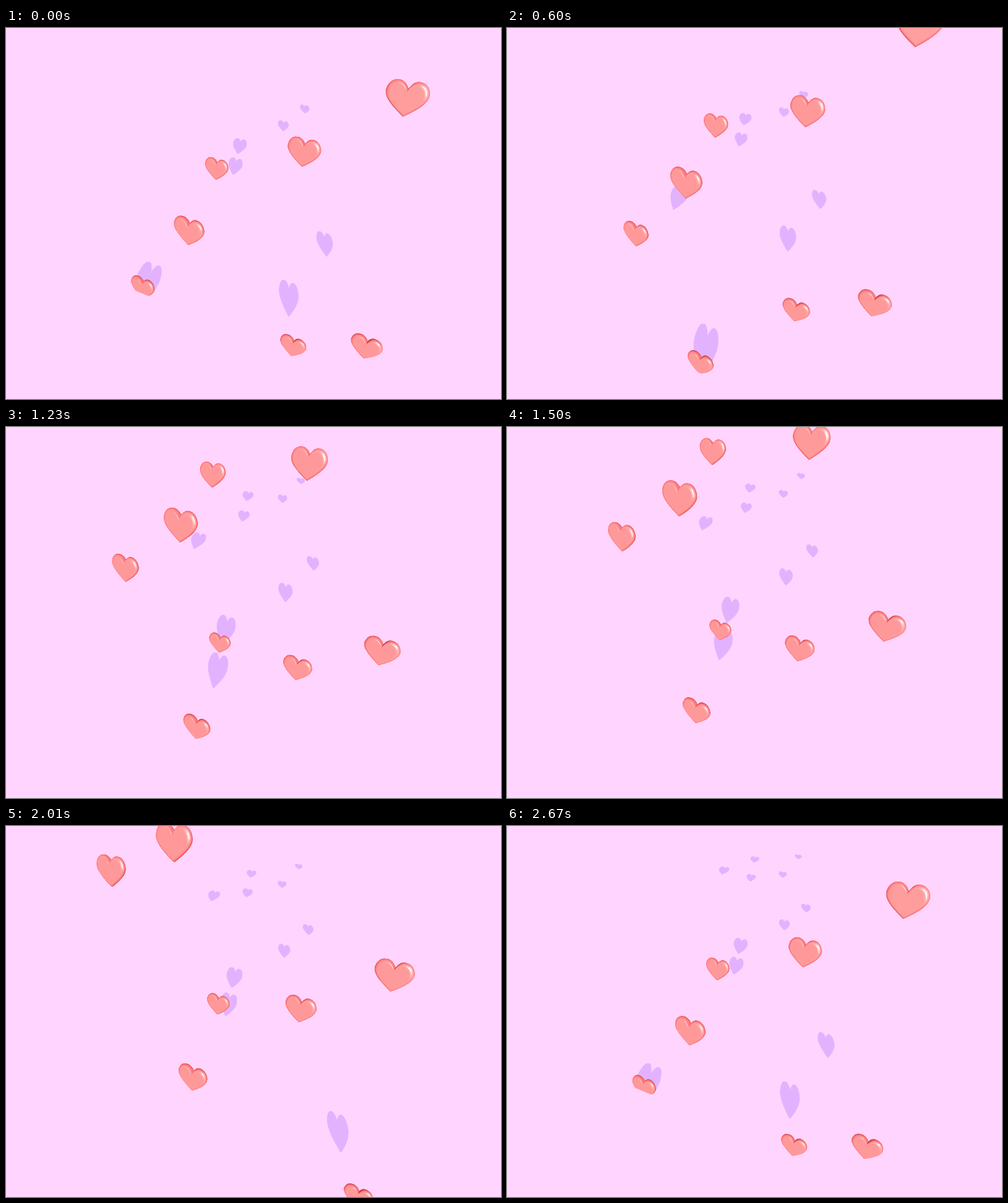
Animation, 800 px wide and 600 px high, one loop 2.7 s. Source, as an HTML page with a canvas:

```html
<!DOCTYPE html>
<html lang="en">
<head>
<meta charset="utf-8">
<title>Rising hearts</title>
<style>
html, body { margin: 0; width: 100%; height: 100%; overflow: hidden; background: #ffd4ff; }
canvas { display: block; }
</style>
</head>
<body>
<canvas id="stage" width="800" height="600"></canvas>
<script>
const ctx = document.getElementById('stage').getContext('2d');
const LOOP = 2700, STEP = 30;
const BG = '#ffd4ff', SHADE = '#e3b2ff';

// Camera one unit above the floor, pitched down; low sun behind it.
const FOCAL = 794, PITCH = 0.5352, YAW = Math.PI / 6, LEAN = 0.1;
const SP = Math.sin(PITCH), CP = Math.cos(PITCH);
const SY = Math.sin(YAW), CY = Math.cos(YAW);
const SHADOW = [0.119, 2.9];
const SUN = unit([-0.119, 1, -2.9]);

// Each spot on the floor: x, depth, size, and [height at loop start, speed per second] of its hearts.
const SPOTS = [
  { x: -0.1138, z: 1.373, size: 0.065, runs: [[-0.1665, 0.189], [0.3466, 0.233]] },
  { x: -0.3463, z: 1.205, size: 0.071, runs: [[-0.579, 0.22], [0.0152, 0.3335]] },
  { x: -0.1387, z: 0.889, size: 0.061, runs: [[-0.0896, 0.192], [0.429, 0.193]] },
  { x: 0.0965, z: 0.87, size: 0.054, runs: [[-0.461, 0.21], [0.106, 0.191], [0.6215, 0.1345]] },
  { x: 0.2275, z: 0.716, size: 0.051, runs: [[-0.346, 0.225], [0.2615, 0.19], [0.7755, 0.169]] }
];

function dot(a, b) { return a[0] * b[0] + a[1] * b[1] + a[2] * b[2]; }
function sub(a, b) { return [a[0] - b[0], a[1] - b[1], a[2] - b[2]]; }
function add(a, b) { return [a[0] + b[0], a[1] + b[1], a[2] + b[2]]; }
function unit(a) { const l = Math.hypot(...a) || 1; return a.map(v => v / l); }
function cross(a, b) {
  return [a[1] * b[2] - a[2] * b[1], a[2] * b[0] - a[0] * b[2], a[0] * b[1] - a[1] * b[0]];
}

function outline() {
  const curves = [
    [[0, 25], [0, 25], [8, 0], [26, 0]],
    [[26, 0], [55, 0], [55, 33], [55, 33]],
    [[55, 33], [55, 53], [31, 74], [0, 97]]
  ];
  const half = [];
  for (const [a, b, c, d] of curves) {
    for (let i = 0; i < 9; i++) {
      const t = i / 9, u = 1 - t;
      const at = k => u * u * u * a[k] + 3 * u * u * t * b[k] + 3 * u * t * t * c[k] + t * t * t * d[k];
      half.push([at(0) / 110 * 1.25, 0.48 - at(1) / 95]);
    }
  }
  const left = half.slice(1).reverse().map(([x, y]) => [-x, y]);
  return [...half, [0, 0.48 - 97 / 95], ...left];
}

// Rounded heart of height 1, already turned by the yaw and leaning back a little.
function buildHeart() {
  const shape = outline(), rings = [], quads = [], n = shape.length, R = 10, mid = 0.03;
  for (let r = 0; r <= R; r++) {
    const a = (r / R - 0.5) * Math.PI;
    const s = 1 - 0.2 * (1 - Math.cos(a));
    rings.push(shape.map(([px, py]) => {
      const x = px * s, y = mid + (py - mid) * s;
      const depth = 0.1 * Math.sin(a) - LEAN * y;
      return [x * CY - depth * SY, y, -x * SY - depth * CY];
    }));
  }
  for (let r = 0; r < R; r++) {
    for (let i = 0; i < n; i++) {
      const j = (i + 1) % n;
      const pts = [rings[r][i], rings[r][j], rings[r + 1][j], rings[r + 1][i]];
      let normal = unit(cross(sub(pts[2], pts[0]), sub(pts[3], pts[1])));
      const out = sub(pts[0], [0, mid, 0]);
      if (dot(normal, out) < 0) normal = normal.map(v => -v);
      quads.push({ pts, normal });
    }
  }
  quads.push({ pts: rings[R], normal: unit([-SY, LEAN, -CY]) });
  return { quads, layers: [rings[0], rings[3], rings[5], rings[7], rings[R]] };
}
const heart = buildHeart();

function aboveFloor(pts) {
  if (pts.every(p => p[1] >= 0)) return pts;
  const out = [];
  pts.forEach((p, i) => {
    const q = pts[(i + 1) % pts.length];
    if (p[1] >= 0) out.push(p);
    if ((p[1] >= 0) !== (q[1] >= 0)) {
      const t = p[1] / (p[1] - q[1]);
      out.push([p[0] + (q[0] - p[0]) * t, 0, p[2] + (q[2] - p[2]) * t]);
    }
  });
  return out;
}

function project([x, y, z]) {
  const depth = z * CP + (1 - y) * SP;
  return [400 + FOCAL * x / depth, 300 + FOCAL * ((1 - y) * CP - z * SP) / depth];
}

function trace(pts) {
  ctx.beginPath();
  for (const p of pts) ctx.lineTo(...project(p));
  ctx.closePath();
}

function place(pts, pos, size) {
  return aboveFloor(pts.map(p => add(pos, p.map(v => v * size))));
}

function colour(normal, halfway) {
  const lit = Math.max(0, dot(normal, SUN));
  const shine = 115 * Math.pow(Math.max(0, dot(normal, halfway)), 40);
  const red = Math.min(255, 185 + 240 * lit + shine);
  const rest = Math.min(255, 68 + 98 * lit + shine);
  return `rgb(${red | 0},${rest | 0},${rest | 0})`;
}

function drawShadow({ pos, size }) {
  ctx.fillStyle = SHADE;
  for (const layer of heart.layers) {
    const pts = place(layer, pos, size);
    if (pts.length < 3) continue;
    trace(pts.map(([x, y, z]) => [x + SHADOW[0] * y, 0, z + SHADOW[1] * y]));
    ctx.fill();
  }
}

function drawHeart({ pos, size }) {
  const y = project(pos)[1];
  if (y < -60 || y > 680) return;
  const view = sub([0, 1, 0], pos);
  const halfway = unit(add(SUN, unit(view)));
  ctx.lineWidth = 0.6;
  ctx.lineJoin = 'round';
  for (const { pts, normal } of heart.quads) {
    if (dot(normal, view) <= 0) continue;
    const shown = place(pts, pos, size);
    if (shown.length < 3) continue;
    ctx.fillStyle = ctx.strokeStyle = colour(normal, halfway);
    trace(shown);
    ctx.fill();
    ctx.stroke();
  }
}

function draw(ms) {
  const t = Math.floor((ms % LOOP) / STEP) * STEP / 1000;
  const items = [];
  for (const { x, z, size, runs } of SPOTS) {
    for (const [start, speed] of runs) {
      const h = start + speed * t;
      if (h > -size * 0.5) items.push({ pos: [x, h, z], size });
    }
  }
  ctx.fillStyle = BG;
  ctx.fillRect(0, 0, 800, 600);
  items.forEach(drawShadow);
  items.forEach(drawHeart);
}

let begin = null;
function tick(now) {
  if (begin === null) begin = now;
  draw(now - begin);
  requestAnimationFrame(tick);
}
draw(0);
requestAnimationFrame(tick);
</script>
</body>
</html>
```
